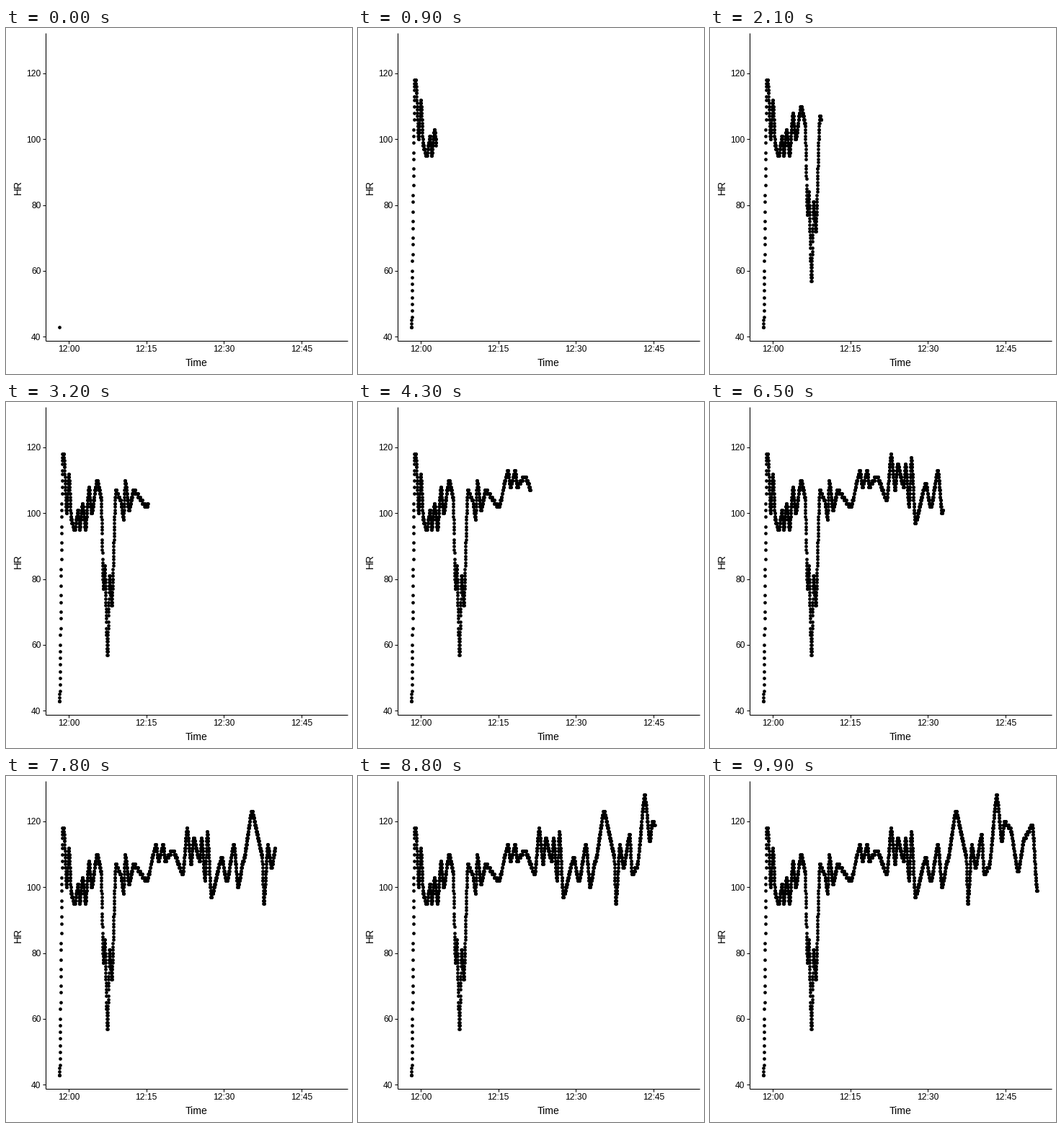
Animation of 480x480 px, one loop 10000 ms. Source, as a matplotlib script:

```python
import numpy as np
import matplotlib.pyplot as plt
from matplotlib.animation import FuncAnimation

SIZE, DPI = 480, 100
FRAMES, INTERVAL = 100, 100
PT = 72 / DPI                      # one pixel in points
X_START, X_END = 73.8, 453.8       # first and last sample
NOON, PX_PER_MIN = 87.1, 7.175
BASE, PX_PER_BEAT = 428.3, 4.566   # y of HR 40

plt.rcParams["font.family"] = "Liberation Sans"

# Turning points of the curve: (x, heart rate)
TURNS = [
    (74.2, 43), (78.4, 118), (80, 118), (83.9, 100), (87, 112), (90.3, 98),
    (95, 95), (100, 101), (102, 95), (106, 103), (110, 95), (114.8, 108),
    (118.5, 100), (126, 110), (131.5, 105), (135, 77), (136.8, 84),
    (140.5, 57), (143.5, 81), (146.5, 72), (152, 107), (159, 104), (163, 98),
    (165, 110), (170.5, 101), (176.5, 107), (195, 102), (208, 113),
    (211, 108), (218, 113), (220.5, 108), (231, 111.4), (245, 104),
    (251, 118), (256.5, 107), (260, 115), (268.5, 108), (271, 115),
    (276, 102), (279, 117), (284.5, 97), (299, 109), (306, 101.6),
    (316, 113), (321.5, 100), (329, 108), (341, 123), (355, 110),
    (357.5, 95), (363, 113), (368, 106), (376.5, 116), (380, 104),
    (387, 106.5), (397.5, 128), (404.5, 114), (408, 120), (416, 118),
    (427, 105), (436, 115), (447, 119), (453.3, 99),
]


def heart_rate(x):
    """Ease between turning points and round to whole beats."""
    tx, hr = np.array(TURNS).T
    x = np.clip(x, tx[0], tx[-1])
    i = np.clip(np.searchsorted(tx, x, side="right") - 1, 0, len(tx) - 2)
    t = (x - tx[i]) / (tx[i + 1] - tx[i])
    t = (t + t * t * (3 - 2 * t)) / 2
    return np.rint(hr[i] + (hr[i + 1] - hr[i]) * t)


def beat_y(hr):
    return BASE - (hr - 40) * PX_PER_BEAT


xs = np.arange(X_START, X_END, PX_PER_MIN / 60)
ys = beat_y(heart_rate(xs))

fig = plt.figure(figsize=(SIZE / DPI, SIZE / DPI), dpi=DPI, facecolor="white")
ax = fig.add_axes([0, 0, 1, 1])
ax.set(xlim=(0, SIZE), ylim=(SIZE, 0))
ax.axis("off")


def rule(x, y):
    ax.plot(x, y, color="black", lw=1.07 * PT, solid_capstyle="butt")


def label(x, y, text, size=12, ha="center", angle=0):
    ax.text(x, y, text, fontsize=size * PT, ha=ha, va="baseline",
            rotation=angle, rotation_mode="anchor")


LEFT, BOTTOM, TICK = 55, 433.8, 3.7
rule([LEFT, LEFT], [6.5, BOTTOM])
rule([LEFT, 473.5], [BOTTOM, BOTTOM])

for minute in range(0, 60, 15):
    x = NOON + minute * PX_PER_MIN
    rule([x, x], [BOTTOM, BOTTOM + TICK])
    label(x, 449.3, f"12:{minute:02d}")

for hr in range(40, 121, 20):
    y = beat_y(hr)
    rule([LEFT - TICK, LEFT], [y, y])
    label(48.4, y + 4.4, str(hr), ha="right")

label(264, 469, "Time", 14)
label(21, 220.5, "HR", 14, angle=90)

dots, = ax.plot([], [], "o", color="black", ms=4.7 * PT, mew=0)


def update(frame):
    now = X_START + (X_END - X_START) * frame / (FRAMES - 1)
    shown = xs <= now
    dots.set_data(xs[shown], ys[shown])
    return dots,


anim = FuncAnimation(fig, update, frames=FRAMES, interval=INTERVAL,
                     repeat=True, repeat_delay=0)
plt.show()
```
